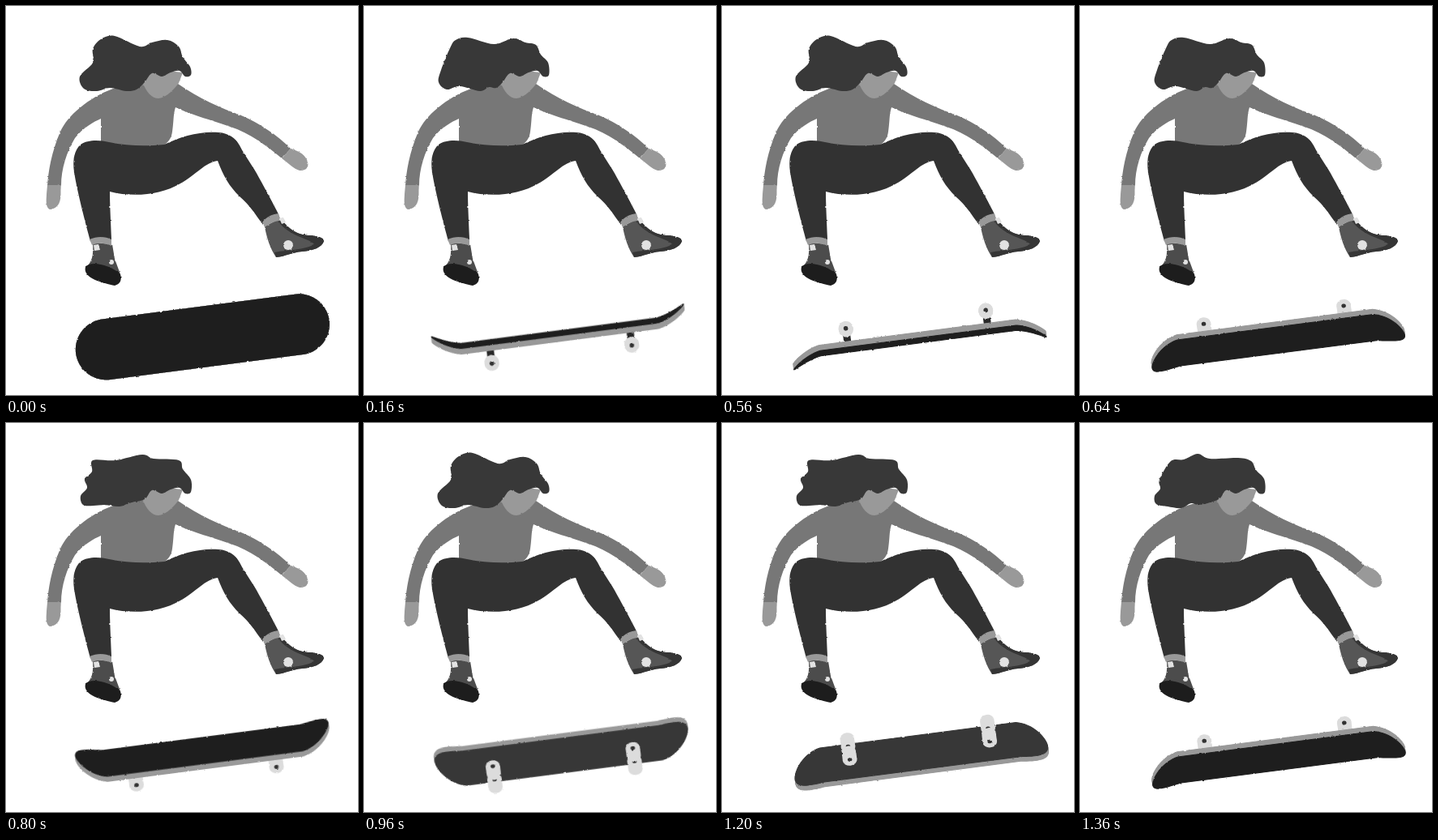
Recreate the animation shown at these times as an HTML page. Size 434 by 480 pixels, loop 1.44 s.

```html
<!DOCTYPE html>
<html lang="en">
<head>
<meta charset="utf-8">
<title>Kickflip</title>
<style>
  html, body { margin: 0; width: 100%; height: 100%; overflow: hidden; background: #fff; }
  svg { display: block; width: 434px; height: 480px; }
</style>
</head>
<body>
<svg viewBox="0 0 434 480">
  <filter id="rough" x="0" y="0" width="434" height="480" filterUnits="userSpaceOnUse" color-interpolation-filters="sRGB">
    <feTurbulence type="fractalNoise" baseFrequency=".3" numOctaves="1" seed="4"/>
    <feDisplacementMap in="SourceGraphic" scale="2.4" xChannelSelector="R" yChannelSelector="G"/>
  </filter>
  <g filter="url(#rough)">
    <!-- sweater -->
    <path fill="#777" d="M132 102C102 113 76 135 67 155C56 180 52 205 51 222L68 222C68 200 75 180 85 163C95 150 108 143 117 139L117 174L190 174C200 170 204 163 205 155C207 142 206 134 209 125C225 133 260 143 285 152C310 163 328 178 340 188L351 176C335 160 312 144 290 135C265 126 238 114 212 96L170 90Z"/>
    <!-- hands and face -->
    <g fill="#999">
      <path d="M51 221L68 221C67 228 68 232 67 238C66 246 60 251 54 251C48 248 50 238 50 232Z"/>
      <path d="M340 188L351 176C358 178 368 182 371 190C375 198 370 204 362 203C355 201 348 194 340 188Z"/>
      <path d="M168 93C173 107 180 114 188 114C198 113 208 102 213 95L218 82L180 78Z"/>
    </g>
    <!-- trousers -->
    <path fill="#323232" d="M92 171C100 165 115 165 127 168C150 173 175 173 195 171C215 161 240 154 262 156C275 157 283 163 288 172C295 186 305 198 312 212C322 230 330 245 336 257L317 270C308 258 300 245 288 235C275 222 268 210 261 191C245 193 235 208 215 219C190 234 155 236 128 229C128 245 129 262 130 288L104 290C98 268 88 230 84 205C82 190 84 178 92 171Z"/>
    <!-- left foot -->
    <path fill="#4c4c4c" d="M107 292L131 294L134 312L141 331L100 321C106 315 108 308 107 292Z"/>
    <path fill="#1d1d1d" d="M98 322C104 314 128 319 141 331C143 338 141 343 134 345C120 342 94 336 98 322Z"/>
    <path fill="#999" d="M103 288C112 284 122 284 130 288L130 296C122 292 114 292 106 295Z"/>
    <path fill="#e2e2e2" d="M108 295L114 294L116 301L109 302Z"/>
    <circle fill="#e2e2e2" cx="130" cy="316" r="3"/>
    <!-- right foot -->
    <path fill="#565656" d="M319 272L338 262C347 272 354 279 365 282C378 284 390 283 392 290C390 298 378 302 365 303C352 304 345 309 333 310C326 300 321 285 319 272Z"/>
    <path fill="#353535" d="M334 264L341 265C348 274 356 280 366 282C378 284 390 283 392 290C390 298 378 302 365 303C352 304 345 309 333 310L331 304C345 301 370 301 380 294C374 286 350 286 334 264Z"/>
    <path fill="#999" d="M316 267C321 260 328 257 336 256L339 265C332 265 325 268 319 273Z"/>
    <path fill="#e2e2e2" d="M337 262L342 261L345 267L340 269Z"/>
    <circle fill="#e2e2e2" cx="348" cy="295" r="6"/>
    <path id="hair" fill="#383838"/>
    <g id="board"></g>
  </g>
</svg>
<script>
const TICK = 40, TICKS = 36, TURN = 18;
const hair = document.getElementById('hair'), board = document.getElementById('board');

// Crown outlines from the neck round to the right temple; the fringe is shared.
const crowns = [
  '161 103 148 105 128 101 112 105 96 102 91 87 107 70 107 53 117 41 134 37 165 50 180 45 199 42 213 50 218 63 227 75',
  '163 101 154 100 143 105 118 99 102 103 92 94 95 79 106 52 113 42 128 39 160 47 184 40 199 45 212 48 218 60 227 70',
  '155 98 140 103 122 101 108 102 95 101 92 90 100 80 97 69 106 60 107 46 135 46 168 39 182 44 213 46 218 57 228 70',
  '148 101 137 99 125 105 108 103 94 100 92 90 99 81 98 70 112 47 128 45 145 38 160 44 195 43 211 47 217 58 227 69'
];
const fringe = '228 85 221 87 214 80 203 82 192 87 180 83 171 94';

function smooth(text) {
  const n = text.split(' ').map(Number), count = n.length / 2;
  const at = i => { i = (i + count) % count; return [n[2 * i], n[2 * i + 1]]; };
  let d = 'M' + at(0);
  for (let i = 0; i < count; i++) {
    const [a, b, c, e] = [at(i - 1), at(i), at(i + 1), at(i + 2)];
    d += 'C' + [0, 1].map(k => b[k] + (c[k] - a[k]) / 6) + ' ' +
      [0, 1].map(k => c[k] - (e[k] - b[k]) / 6) + ' ' + c;
  }
  return d + 'Z';
}
const hairPaths = crowns.map(crown => smooth(crown + ' ' + fringe));

// Board poses within one turn: [tick, roll in degrees].
const poses = [[0, 0], [2, 64], [4, 85], [6, 125], [8, 180], [11, 235], [14, 275], [16, 296]];

function drawBoard(tick, roll) {
  const c = Math.cos(roll * Math.PI / 180), s = Math.sin(roll * Math.PI / 180);
  const rise = (v, w) => v * c - w * s;

  // Deck outline at height w, with both tips kicked up.
  const layer = (w, fill) => {
    const points = [];
    for (let i = 0; i < 64; i++) {
      const a = (i + .5) / 64 * 2 * Math.PI;
      const u = 37 * Math.cos(a) + 120 * Math.sign(Math.cos(a));
      const lift = 17 * (Math.max(0, Math.abs(u) - 110) / 47) ** 2;
      points.push(u.toFixed(1) + ',' + rise(37 * Math.sin(a), w + lift).toFixed(1));
    }
    return `<polygon points="${points.join(' ')}" fill="${fill}" stroke="${fill}" stroke-linejoin="round"/>`;
  };

  const ellipse = (x, y, r, fill) =>
    `<ellipse cx="${x}" cy="${y}" rx="${r}" ry="${r * Math.abs(s)}" fill="${fill}"/>`;

  const wheel = (u, side) => {
    const y = rise(side * 25 * Math.abs(c), -21), half = 8.5 * c * Math.sign(s || 1);
    const h = Math.abs(half);
    const body = `<rect x="${u - 8.8}" y="${y - h}" width="17.6" height="${2 * h}" rx="${Math.min(2.5, h)}" fill="#dcdcdc"/>`;
    return body + ellipse(u, y - half, 8.8, '#dcdcdc') + ellipse(u, y + half, 9, '#dcdcdc') +
      (Math.abs(s) > .2 ? ellipse(u, y + half, 2.8, '#333') : '');
  };

  const truck = u => {
    const near = s < 0 ? -1 : 1, reach = 17 * c * Math.abs(c), y = rise(0, -21);
    return `<path d="M${u} ${rise(0, -3)}V${y}M${u} ${y - reach}V${y + reach}" stroke="#282828" stroke-width="9"/>` +
      wheel(u, -near) + wheel(u, near);
  };

  const topShown = c > 0, dir = topShown ? 1 : -1;
  let deck = '';
  for (let w = -3.5; w < 3.5; w++) deck += layer(w * dir, '#999');
  deck += layer(3.5 * dir, topShown ? '#1e1e1e' : '#373737');
  const trucks = truck(-87) + truck(87);

  const x = 242.7 - 2 * Math.sin((tick + 1) / TICKS * 2 * Math.PI);
  board.setAttribute('transform', `translate(${x} 408.3) rotate(-7.4)`);
  board.innerHTML = topShown ? trucks + deck : deck + trucks;
}

let shown = -1;
function frame() {
  const tick = Math.floor(performance.now() / TICK) % TICKS;
  if (tick !== shown) {
    shown = tick;
    hair.setAttribute('d', hairPaths[Math.floor(tick / 3) % 4]);
    const [start, roll] = poses.filter(p => p[0] <= tick % TURN).pop();
    drawBoard(tick - tick % TURN + start, roll);
  }
  requestAnimationFrame(frame);
}
frame();
</script>
</body>
</html>
```
